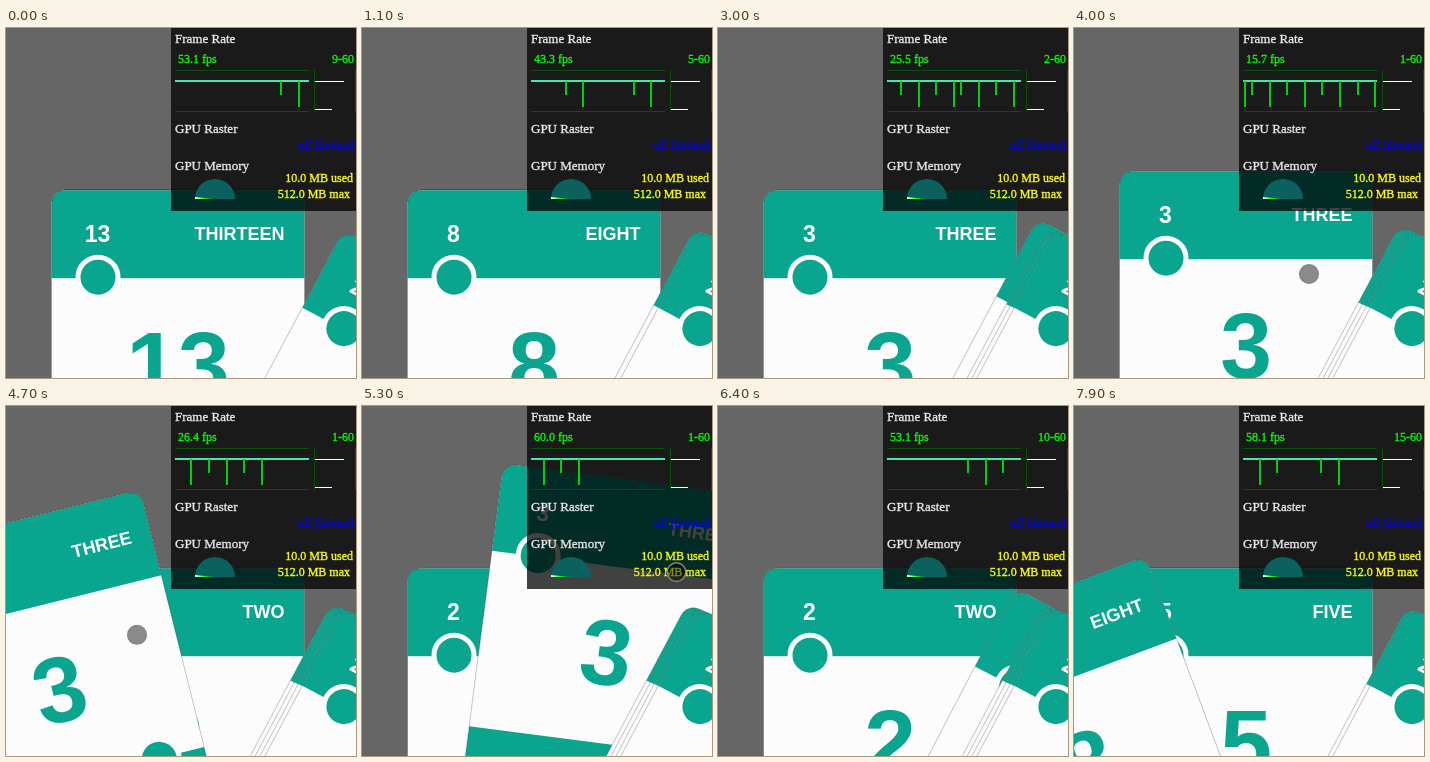
An HTML page with a canvas for the animation above (8 s loop, 350x350 px).

```html
<!DOCTYPE html>
<html lang="en">
<head>
<meta charset="utf-8">
<title>Card swipe</title>
<style>
html, body { margin: 0; width: 100%; height: 100%; overflow: hidden; background: #666; }
canvas { display: block; }
</style>
</head>
<body>
<canvas id="stage" width="350" height="350"></canvas>
<script>
const ctx = document.getElementById('stage').getContext('2d');
const LOOP = 8000, STEP = 100;
const TEAL = '#09a58f', WHITE = '#fcfcfc';
const SANS = 'px "Liberation Sans", Arial, sans-serif';
const SERIF = 'px "Liberation Serif", Times, serif';
const W = 253, H = 353, HEAD = 88, CENTER = [172, 338.7];
const FLY = 600, UNDO = 6400, LEAVE = 7200;

// A pose is [dx, dy, degrees] from the home place; drags hold [ms, ...pose].
const HOME = [0, 0, 0], AWAY = [-157, 21, -20.5];
const FLICK = [[0, 0, 0, 0], [450, 88, -28, 9]];
const ROAM = [[0, 0, 0, 0], [300, 0, -19, 0], [700, -60, -141, -7], [1000, -118, -53, -14],
  [1600, 72, -90, 7.4], [2000, -24, -60, -3], [2340, 40, -10, 8]];

// From the bottom of the deck to the top of the pile.
const cards = [
  { num: '2', word: 'TWO' },
  { num: '3', word: 'THREE', slot: 4, start: 3700, drag: ROAM, grip: [235, 265] },
  { num: '5', word: 'FIVE', slot: 3, start: 2100, drag: FLICK, grip: [268, 268] },
  { num: '8', word: 'EIGHT', slot: 2, start: 1200, drag: FLICK, grip: [268, 268] },
  { num: '13', word: 'THIRTEEN', slot: 1, start: 100, drag: FLICK, grip: [268, 268] },
  { num: '20', word: 'TWENTY', slot: 0, start: -5000, drag: FLICK }
];

const speed = [[0, 53.1, 9], [2100, 34.4, 2], [4000, 15.7, 1], [4700, 26.4, 1],
  [5300, 60, 1], [6400, 53.1, 10], [7900, 58.1, 15]];
const dipRuns = [[-28, 2], [40, 6], [135, 8], [363, 3], [442, 2]];

const clamp = (v, lo = 0, hi = 1) => Math.min(hi, Math.max(lo, v));
const mix = (a, b, u) => a.map((v, i) => v + (b[i] - v) * u);
const easeOut = u => 1 - (1 - u) ** 2;

function at(keys, t) {
  const i = keys.findIndex(k => k[0] > t);
  if (i < 1) return (i ? keys[keys.length - 1] : keys[0]).slice(1);
  const a = keys[i - 1], b = keys[i];
  return mix(a, b, (t - a[0]) / (b[0] - a[0])).slice(1);
}

const dragTime = card => card.drag[card.drag.length - 1][0];

function pose({ slot, start, drag, num }, t) {
  if (slot === undefined) return HOME;
  if (num === '8' && t > LEAVE) return mix(HOME, AWAY, clamp((t - LEAVE) / 700));
  const pile = [194.5 - 4 * slot, 78.5 - 1.7 * slot, 28];
  const fly = easeOut(clamp((t - start - dragTime({ drag })) / FLY));
  const held = at(drag, t - start);
  const now = mix(held, pile, fly);
  now[2] = held[2] + (pile[2] - held[2]) * easeOut(fly);
  return slot > 1 ? mix(now, HOME, clamp((t - UNDO) / 300)) : now;
}

function text(str, x, y, font, color, align = 'left') {
  ctx.font = font;
  ctx.fillStyle = color;
  ctx.textAlign = align;
  ctx.fillText(str, x, y);
}

function label(str, x, y, size, color, align) {
  text(str, x, y, size + SERIF, color, align);
  ctx.strokeStyle = color;
  ctx.lineWidth = .35;
  ctx.strokeText(str, x, y);
}

function rect(x, y, w, h, color) {
  ctx.fillStyle = color;
  ctx.fillRect(x, y, w, h);
}

function disc(x, y, r, fill, stroke, width) {
  ctx.beginPath();
  ctx.arc(x, y, r, 0, 7);
  ctx.fillStyle = fill;
  ctx.fill();
  ctx.strokeStyle = stroke;
  ctx.lineWidth = width;
  ctx.stroke();
}

function cardEnd({ num, word }) {
  rect(-W / 2, -H / 2, W, HEAD, TEAL);
  text(num, 46 - W / 2, 52 - H / 2, 'bold 23' + SANS, '#fff', 'center');
  text(word, 233 - W / 2, 50 - H / 2, 'bold 18' + SANS, '#fff', 'right');
  disc(46.5 - W / 2, 87 - H / 2, 20, TEAL, WHITE, 5);
}

function drawCard(card, t) {
  const [dx, dy, deg] = pose(card, t);
  ctx.save();
  ctx.translate(CENTER[0] + dx, CENTER[1] + dy);
  ctx.rotate(deg * Math.PI / 180);
  const shape = new Path2D();
  shape.roundRect(-W / 2, -H / 2, W, H, 14);
  ctx.fillStyle = WHITE;
  ctx.fill(shape);
  ctx.save();
  ctx.clip(shape);
  cardEnd(card);
  ctx.rotate(Math.PI);
  cardEnd(card);
  ctx.restore();
  text(card.num, 0, 30, 'bold 93' + SANS, TEAL, 'center');
  ctx.strokeStyle = 'rgba(0,0,0,.22)';
  ctx.lineWidth = 1;
  ctx.stroke(shape);
  ctx.restore();
}

function drawGraph(t) {
  const dim = '#0a4f0a';
  rect(169, 42, 134, 1, dim);
  rect(169, 83, 134, 1, dim);
  rect(308, 42, 1, 42, dim);
  rect(349, 42, 1, 42, dim);
  rect(169, 52, 134, 2, '#3fecac');
  rect(309, 53, 29, 1, '#fff');
  rect(309, 81, 17, 1, '#fff');

  const scroll = .065 * (t - clamp(t - 6700, 0, 240));
  for (const [first, count] of dipRuns) {
    for (let i = 0; i < count; i++) {
      const x = Math.round(303 + first + i * 17.6 - scroll);
      if (x > 169 && x < 303) rect(x - 1, 53, 2, i % 2 ? 26 : 14, '#00d010');
    }
  }
}

function drawDial() {
  const wedge = (end, fill) => {
    ctx.beginPath();
    ctx.moveTo(209, 171);
    ctx.arc(209, 171, 20, Math.PI, end);
    ctx.fillStyle = fill;
    ctx.fill();
  };
  const shine = ctx.createLinearGradient(189, 0, 209, 0);
  ['#fff', '#0f0', '#084'].forEach((c, i) => shine.addColorStop(i / 2, c));
  wedge(Math.PI * 2, '#0a615d');
  wedge(Math.PI * 1.03, shine);
}

function drawMeter(t) {
  rect(165, 0, 185, 183, 'rgba(0,0,0,.74)');
  [['Frame Rate', 15], ['GPU Raster', 105], ['GPU Memory', 142]]
    .forEach(([s, y]) => label(s, 169, y, 13, '#e8e8e8'));
  const [fps, low] = at(speed, t);
  label(fps.toFixed(1) + ' fps', 172, 35, 12, '#0f0');
  label(Math.round(low) + '-60', 348, 35, 12, '#0f0', 'right');
  drawGraph(t);
  drawDial();
  label('off (device)', 348, 121, 12, '#00f', 'right');
  label('10.0 MB used', 347, 154, 12, '#ff0', 'right');
  label('512.0 MB max', 344, 170, 12, '#ff0', 'right');
}

// The finger runs slightly ahead of the tilted card.
function drawFinger(t) {
  const card = cards.find(c => c.grip && t >= c.start && t <= c.start + dragTime(c));
  if (!card) return;
  const [dx, dy, deg] = pose(card, t);
  disc(card.grip[0] + dx + Math.abs(deg), card.grip[1] + dy - 1.2 * deg,
    9.3, 'rgba(0,0,0,.45)', '#858585', 1.5);
}

function draw(t) {
  rect(0, 0, 350, 350, '#666');
  cards.forEach(card => drawCard(card, t));
  drawMeter(t);
  drawFinger(t);
}

function tick() {
  const t = performance.now() % LOOP;
  draw(Math.floor(t / STEP) * STEP);
  requestAnimationFrame(tick);
}
tick();
</script>
</body>
</html>
```
